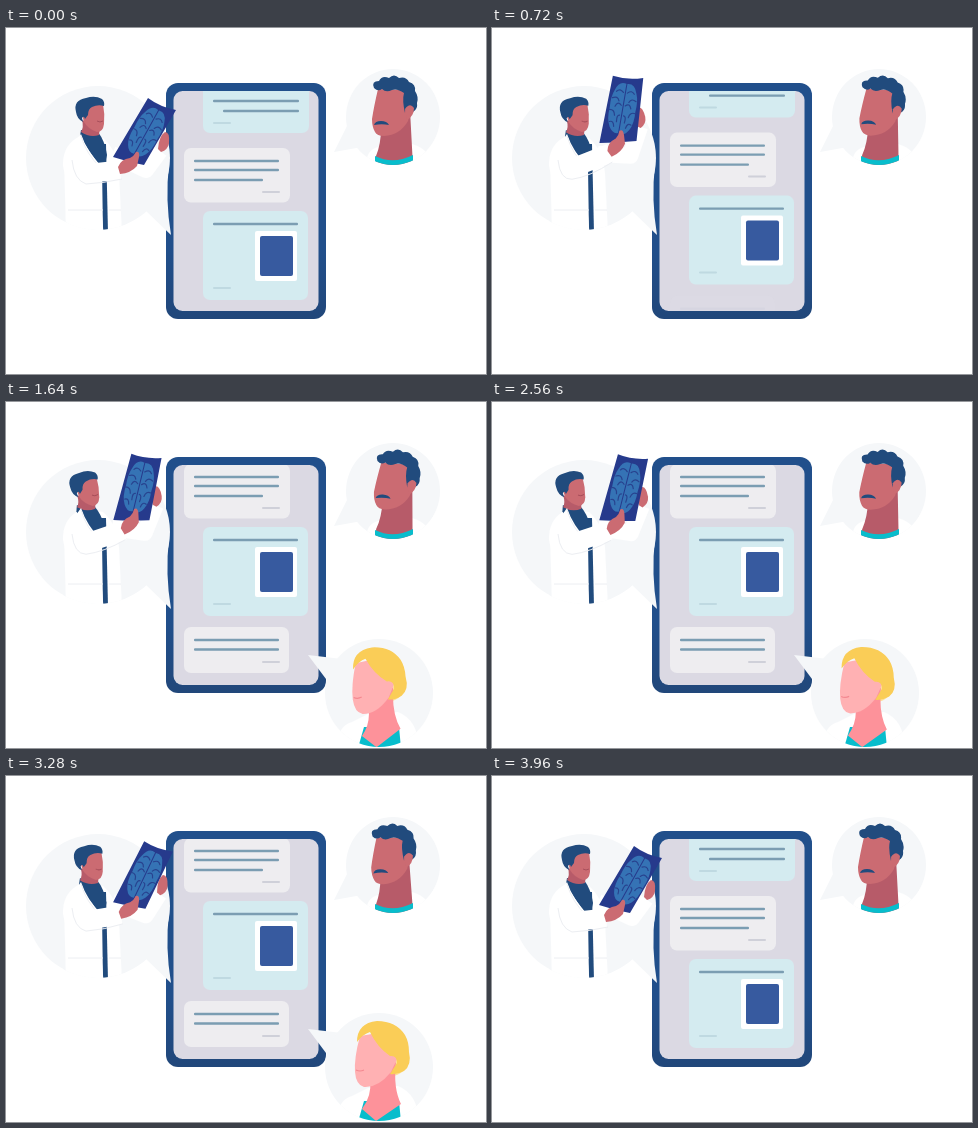
Recreate the animation shown at these times as an HTML page. Size 480 px wide and 346 px high, loop 4 s.

```html
<!DOCTYPE html>
<html lang="en">
<head>
<meta charset="utf-8">
<style>
html, body { margin: 0; width: 100%; height: 100%; overflow: hidden; background: #fff; }
svg { display: block; width: 480px; height: 346px; }
.bubble { fill: #f5f7f9; }
.navy { fill: #214b7d; }
.skin { fill: #cb6b72; }
.shade { fill: #b75b69; }
.pink { fill: #ffb1b3; }
.rose { fill: #fd929a; }
.hair { fill: #facd57; }
.teal { fill: #08bdcc; }
.white { fill: #fff; }
.sleeve { fill: none; stroke: #fff; stroke-linejoin: round; }
.fold { fill: none; stroke: #eceef2; stroke-width: 1; }
.gyri { fill: none; stroke: #28438f; stroke-width: 1.2; stroke-linecap: round; }
</style>
</head>
<body>
<svg viewBox="0 0 480 346">
  <defs>
    <linearGradient id="shell" x1="0" y1="0" x2="0" y2="1">
      <stop offset=".7" stop-color="#214f8b"/><stop offset="1" stop-color="#21477a"/>
    </linearGradient>
    <clipPath id="screen"><rect x="167.5" y="63" width="145" height="220" rx="9"/></clipPath>
    <clipPath id="docClip"><circle cx="92" cy="130" r="72"/></clipPath>
    <clipPath id="manClip"><path d="M330 0H450V89H434A47 48 0 0 1 340 89H330Z"/></clipPath>
    <clipPath id="womanClip"><circle cx="373" cy="291" r="54"/></clipPath>
  </defs>

  <rect x="160" y="55" width="160" height="236" rx="12" fill="url(#shell)"/>
  <rect x="167.5" y="63" width="145" height="220" rx="9" fill="#dbd9e3"/>
  <g clip-path="url(#screen)"><g id="chat"></g></g>

  <g id="man">
    <ellipse class="bubble" cx="387" cy="89" rx="47" ry="48"/>
    <path class="bubble" d="M341 98L328 124L356 119Z"/>
    <g clip-path="url(#manClip)">
      <path class="white" d="M360 137Q360 122 372 119L406 116Q424 121 425 137Z"/>
      <g id="manHead">
        <path class="shade" d="M375 100Q375 116 370 128V138H407L404 82Z"/>
        <path class="skin" d="M372 61Q368 78 366 91Q366 99 369 104Q371 108 378 108Q394 107 402 93L405 80L400 62Z"/>
        <path class="navy" d="M368 60Q365 53 373 53Q376 47 383 50Q388 45 393 50Q400 48 403 54Q410 56 409 63Q413 69 411 75Q412 81 407 84L403 78Q399 80 399 85Q396 72 398 65Q391 60 386 62Q380 65 376 61Q372 64 368 60Z"/>
        <path class="skin" d="M399 81Q404 74 408 80Q408 88 401 92Z"/>
        <path class="navy" d="M368 97Q369 93 375 93Q381 93 383 97Q376 95.5 368 97Z"/>
      </g>
      <path class="teal" d="M369 128Q387 137 407 127V140H369Z"/>
    </g>
  </g>

  <g id="woman">
    <path class="bubble" d="M302 253L336 257L320 277Z"/>
    <circle class="bubble" cx="373" cy="291" r="54"/>
    <g clip-path="url(#womanClip)">
      <path class="white" d="M331 346Q331 324 346 320L362 312L392 310Q412 318 413 346Z"/>
      <path class="teal" d="M358 325L352 346H395L393 325Z"/>
      <g id="womanHead">
        <path fill="#fde09a" d="M388 280L381 301Q398 300 403 286Z"/>
        <path class="rose" d="M364 304Q366 320 356 333L370 345L395 328Q387 312 390 286Z"/>
        <path class="pink" d="M354 260Q348 282 349 296Q350 309 358 311Q372 312 385 296L392 281L378 256Z"/>
        <path class="hair" d="M351 266Q351 247 371 245Q390 245 399 259Q403 266 403 276Q406 289 398 295Q391 299 384 298L391 287Q391 279 384 280Q371 271 364 256Q357 258 351 266Z"/>
        <path d="M350 294Q354 296 358 294" fill="none" stroke="#f48890" stroke-width="1.2"/>
      </g>
    </g>
  </g>

  <g id="doctor">
    <circle class="bubble" cx="92" cy="130" r="72"/>
    <path class="bubble" d="M163 136Q159 172 165 207L138 181Z"/>
    <g clip-path="url(#docClip)">
      <path class="white" d="M62 205Q64 165 57 138Q56 116 76 107L97 110Q111 122 113 145L116 205Z"/>
      <path class="navy" d="M90 116L97.5 205H102L100 116Z"/>
      <g id="docHead">
        <path class="navy" d="M75 102L92 104Q99 113 101 127L98 142Q84 126 74 108Z"/>
        <path class="shade" d="M76 92L94 98L93 107Q84 110 75 104Q78 99 76 92Z"/>
        <path class="skin" d="M76 86L84 76L97 76Q99 86 98 96Q97 104 91 104Q82 101 78 94Z"/>
        <path class="navy" d="M70 84Q67 72 80 70Q89 67 96 71Q99 74 98 78Q92 76 86 79Q82 81 82 87L79 91Q78 87 76 90L77 94Q71 91 70 84Z"/>
        <path d="M91 93Q94 95 97 93" fill="none" stroke="#a84f5b"/>
      </g>
      <path class="white" d="M75 106Q81 124 96 139L97 205H60L58 130Z"/>
      <path class="fold" d="M75 108Q80 126 95 140M62 182H97M103 182H115"/>
    </g>
    <path id="backSleeve" class="sleeve" stroke-width="16"/>
    <g id="backHand">
      <path class="skin" d="M152 121Q153 108 159 104Q164 104 163 115Q162 122 155 124Z"/>
    </g>
    <path id="frontSleeve" class="sleeve" stroke-width="19"/>
    <path id="frontFold" class="fold"/>
    <g id="film">
      <path id="sheet" fill="#263a8c"/>
      <g id="brain" transform="translate(140 105) rotate(29)"></g>
      <path class="skin" d="M112 139Q115 131 124 130Q128 128 130 124Q134 123 133 129L131 138Q125 145 114 146Z"/>
    </g>
  </g>
</svg>
<script>
const $ = id => document.getElementById(id);
const rect = (x, y, w, h, r, fill) =>
  `<rect x="${x}" y="${y}" width="${w}" height="${h}" rx="${r}" fill="${fill}"/>`;
const line = (x1, x2, y) => rect(x1, y - 1.2, x2 - x1, 2.4, 1, '#7b9db2');
const stamp = (x, y, fill) => rect(x, y - 1, 18, 2, 1, fill);
const SKY = '#d4ebf0', GREY = '#eeedf0', SKY_MARK = '#bfd9e1', GREY_MARK = '#cfd0d9';

$('chat').innerHTML =
  rect(197, 40, 106, 65, 7, SKY) + line(207, 293, 73) + line(217, 293, 83) + stamp(207, 95, SKY_MARK) +
  rect(178, 120, 106, 54.5, 7, GREY) + line(188, 273, 133) + line(188, 273, 142) + line(188, 257, 152) + stamp(256, 164, GREY_MARK) +
  rect(197, 183, 105, 89, 7, SKY) + line(207, 292, 196) + stamp(207, 260, SKY_MARK) +
  rect(249, 203, 42, 50, 2, '#fff') + rect(254, 208, 33, 40, 2, '#375a9f') +
  '<g id="reply">' + rect(178, 283, 105, 46, 7, GREY) + line(188, 273, 296) + line(188, 273, 305.5) + stamp(256, 318, GREY_MARK) + '</g>';

const lobe = side => `<g transform="scale(${side} 1)">
  <path fill="#3573b5" d="M.5 -26Q8 -28 11 -18Q14 -11 13 0Q14 12 10 19Q6 26 .5 24Z"/>
  <path class="gyri" d="M2 -17Q6 -21 9 -17M12 -10Q7 -13 5 -8M2 -4Q6 -8 8 -2M13 2Q8 1 7 7M2 6Q5 6 4 13M11 14Q7 12 6 18"/>
</g>`;
$('brain').innerHTML = lobe(1) + lobe(-1);

const sine = u => (1 - Math.cos(Math.PI * u)) / 2;
const cubic = u => u < .5 ? 4 * u ** 3 : 1 - 4 * (1 - u) ** 3;

// Keys are [time, value, easing into this key].
function at(t, keys) {
  let [t0, v0] = keys[0];
  for (const [t1, v1, ease = sine] of keys) {
    if (t < t1) return t <= t0 ? v0 : v0 + (v1 - v0) * ease((t - t0) / (t1 - t0));
    t0 = t1; v0 = v1;
  }
  return v0;
}

const tracks = {
  scroll: [[532, 0], [1080, -58], [3370, -58], [3965, 0]],
  film: [[110, 0], [1090, 1, cubic], [1180, 1], [1720, .606], [2760, .606], [3540, 0]],
  lean: [[520, 0], [1100, 1], [2780, 1], [3540, 0]],
  man: [[110, 0], [1100, 3], [1720, 2.8], [2220, 2.8], [3300, -1.2], [3880, 0]],
  woman: [[0, -3.3], [2220, -3.3], [2800, 0], [3960, 0]],
  pop: [[640, 0], [1160, 1, cubic], [3400, 1], [3880, 0, cubic]]
};

const set = (id, name, value) => $(id).setAttribute(name, value);
const move = (id, value) => set(id, 'transform', value);

// Follows a point fixed to the film.
function carried(x, y, p) {
  const a = -24.6 * p * Math.PI / 180, dx = x - 108, dy = y - 128;
  return [108 + dx * Math.cos(a) - dy * Math.sin(a),
          128 - 18 * p + dx * Math.sin(a) + dy * Math.cos(a)];
}

function draw(t) {
  const v = {};
  for (const k in tracks) v[k] = at(t, tracks[k]);
  const p = v.film, turn = `rotate(${-24.6 * p} 108 128)`;

  move('chat', `translate(0 ${v.scroll})`);
  set('reply', 'opacity', Math.min(1, v.pop * 3));
  move('film', `translate(0 ${-18 * p}) ${turn}`);
  set('sheet', 'd', `M142 70Q154 79 170 82L${138 + 6 * p} ${137 + 3 * p}Q122 134 107 129Z`);
  move('backHand', `translate(${-3 * p} ${-11 * p}) ${turn}`);
  move('docHead', `rotate(${-5 * v.lean} 88 150)`);
  move('manHead', `rotate(${v.man} 388 130)`);
  move('womanHead', `rotate(${v.woman} 375 335)`);
  move('woman', `translate(302 253) scale(${v.pop}) translate(-302 -253)`);
  set('woman', 'visibility', v.pop > .02 ? 'visible' : 'hidden');

  const [fx, fy] = carried(114, 142, p), [bx, by] = carried(154, 123, p);
  set('frontSleeve', 'd', `M68 121L77 ${146 - 6 * p}L${fx} ${fy}`);
  set('frontFold', 'd', `M66 132Q68 152 80 ${156 - 6 * p}Q98 ${155 - 8 * p} ${fx + 2} ${fy + 9}`);
  set('backSleeve', 'd', `M106 126L${140 - 2 * p} ${142 - 18 * p}L${bx - 2 * p} ${by + 6 * p}`);
}

const start = performance.now();
function tick() {
  draw((performance.now() - start) % 4000);
  requestAnimationFrame(tick);
}
tick();
</script>
</body>
</html>
```
